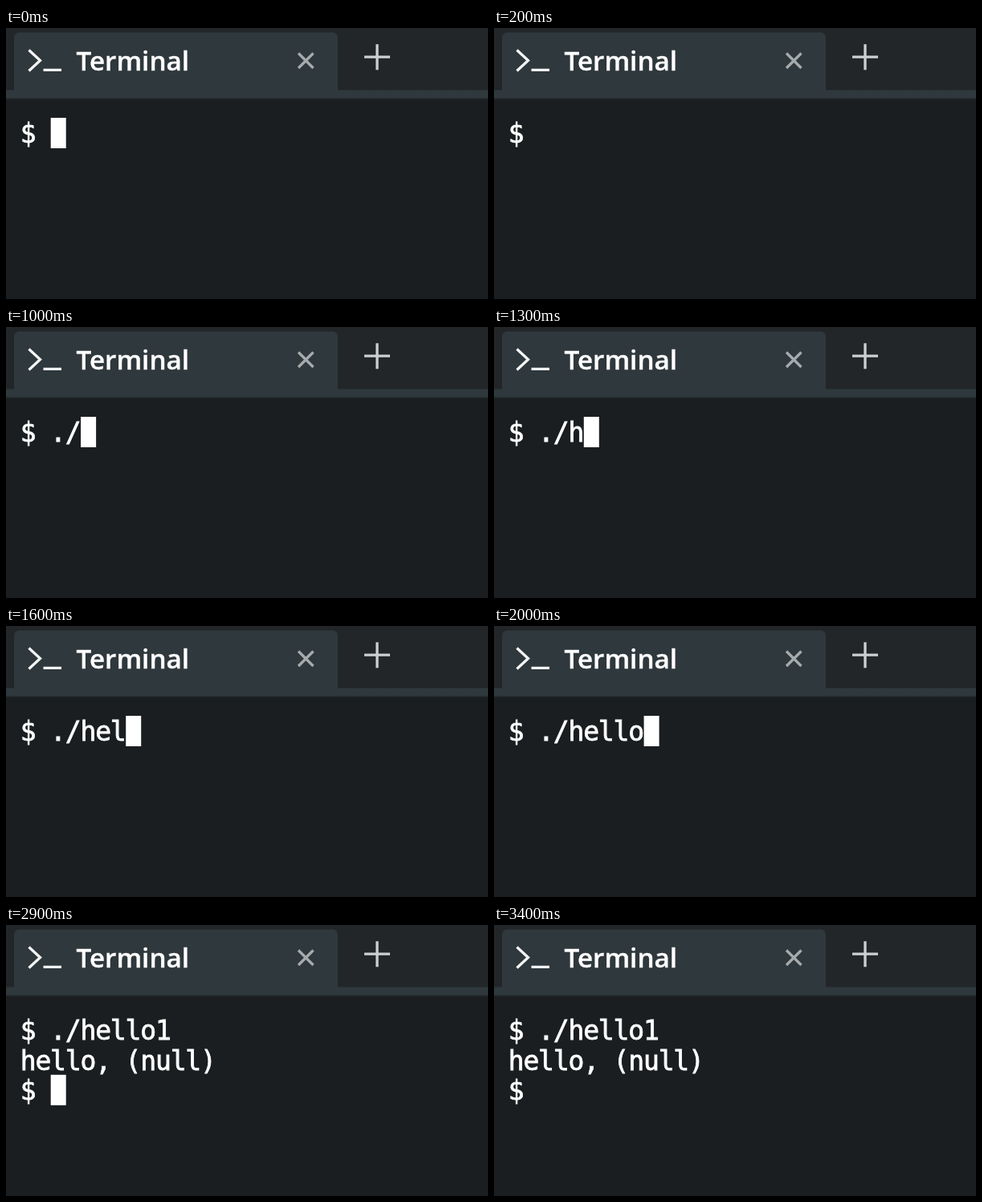
Write an HTML page that moves like this. It is 600 px wide and 338 px high and loops after 3600 ms.

```html
<!DOCTYPE html>
<html lang="en">
<head>
<meta charset="utf-8">
<title>Terminal</title>
<style>
  html, body { margin: 0; width: 100%; height: 100%; overflow: hidden; background: #1a1e20; }
  svg { display: block; width: 100vw; height: 100vh; }
  text { fill: #fff; stroke: #fff; }
  .title { font: 600 33.2px "Open Sans", "Noto Sans", sans-serif; stroke-width: 0.4px; }
  .line {
    font: 33px "DejaVu Sans Mono", "Noto Sans Mono", monospace;
    letter-spacing: -1.17px;
    stroke-width: 0.8px;
    white-space: pre;
  }
  .icon { fill: none; stroke-width: 3.3; }
</style>
</head>
<body>
<svg viewBox="0 0 600 338">
  <defs>
    <linearGradient id="edge" x1="0" y1="0" x2="0" y2="1">
      <stop offset="0" stop-color="#2f393d"/>
      <stop offset="0.75" stop-color="#2f393d"/>
      <stop offset="1" stop-color="#1a1e20"/>
    </linearGradient>
  </defs>
  <rect width="600" height="338" fill="#1a1e20"/>
  <rect width="600" height="78" fill="#222628"/>
  <path d="M10 79V12Q10 5.5 17 5.5H406Q413 5.5 413 12V79Z" fill="#2f383c"/>
  <rect y="77.5" width="600" height="12" fill="url(#edge)"/>
  <path class="icon" d="M28.5 27.5L42.5 40.5L28.5 53.5M46.5 52.3H69" stroke="#f4f5f5"/>
  <text class="title" x="87.5" y="53">Terminal</text>
  <path class="icon" d="M364 31.5L382.5 50M382.5 31.5L364 50" stroke="#a6abad"/>
  <path class="icon" d="M446 36.2H478M462 20.2V52.2" stroke="#ccd0d1"/>
  <g id="screen"></g>
  <rect id="cursor" width="19" height="38" fill="#fff"/>
</svg>
<script>
const LOOP = 3600, LEFT = 18.3, CELL = 18.7, BASE = 143.3, PITCH = 37.4;
const COMMAND = "./hello1";
const OUTPUT = ["$ " + COMMAND, "hello, (null)", "$ "];

// [start ms, lines, cursor shown]
const steps = [[0, ["$ "], true], [200, ["$ "], false]];
[800, 1000, 1300, 1400, 1600, 1700, 2000, 2400].forEach((start, i) =>
  steps.push([start, ["$ " + COMMAND.slice(0, i + 1)], true]));
steps.push([2900, OUTPUT, true], [3400, OUTPUT, false]);

const screen = document.getElementById("screen");
const cursor = document.getElementById("cursor");
const rows = OUTPUT.map((_, i) => {
  const row = document.createElementNS("http://www.w3.org/2000/svg", "text");
  row.setAttribute("class", "line");
  row.setAttribute("x", LEFT - 0.6);
  row.setAttribute("y", BASE + i * PITCH);
  return screen.appendChild(row);
});

let shown;
function draw(now) {
  const time = now % LOOP;
  const step = steps.findLast(([start]) => start <= time);
  if (step !== shown) {
    shown = step;
    const [, lines, visible] = step;
    const last = lines.length - 1;
    rows.forEach((row, i) => { row.textContent = lines[i] || ""; });
    cursor.setAttribute("x", LEFT + lines[last].length * CELL);
    cursor.setAttribute("y", 112 + last * PITCH);
    cursor.style.visibility = visible ? "visible" : "hidden";
  }
}

const origin = performance.now();
function tick() {
  draw(performance.now() - origin);
  requestAnimationFrame(tick);
}
tick();
</script>
</body>
</html>
```
